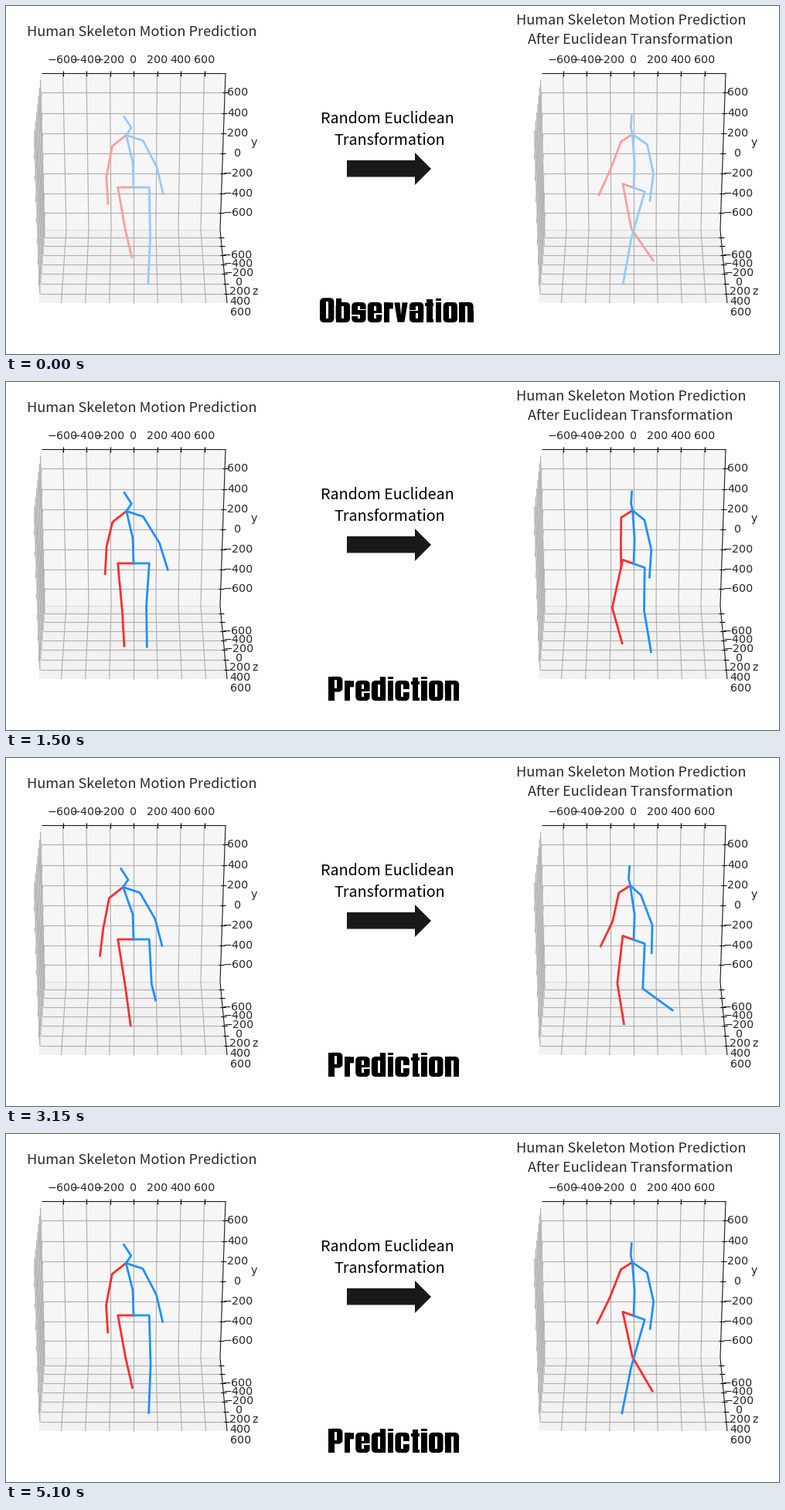
These frames come from a looping animation (1000 px wide and 451 px high, 5250 ms). A matplotlib script:

```python
import numpy as np
import matplotlib.pyplot as plt
from matplotlib.animation import FuncAnimation
from matplotlib.patches import FancyBboxPatch, Polygon
from matplotlib.transforms import Affine2D

W, H = 1000, 451
FRAMES, STEP = 35, 150
OBSERVED = 10     # frames before the prediction starts
STRIDE = 5200     # ms for one full gait cycle
SHIFT = 647       # distance between the two panels
PX = 0.72         # points per pixel at 100 dpi

fig = plt.figure(figsize=(W / 100, H / 100), dpi=100, facecolor="white")
ax = fig.add_axes([0, 0, 1, 1])
ax.set_xlim(0, W)
ax.set_ylim(H, 0)
ax.axis("off")


def lerp(a, b, f):
    return a + (b - a) * f


def fill(points, color, z=1):
    ax.add_patch(Polygon(points, fc=color, lw=0, zorder=z))


def line(a, b, color="#b2b2b2", width=1.2, z=2):
    ax.plot([a[0], b[0]], [a[1], b[1]], color=color, lw=width * PX, zorder=z,
            solid_capstyle="butt")


def label(x, y, text, size=14.2, font="DejaVu Sans", color="#262626", va="center"):
    ax.text(x, y, text, fontsize=size * PX, family=font, color=color,
            ha="center", va=va, zorder=4)


# ---- 3D boxes -------------------------------------------------------------


def panel(dx):
    def at(x, y):
        return np.array([x + dx, y], float)

    top_l, top_r = at(45.5, 87), at(284, 87)
    mid_l, mid_r = at(51, 290), at(277, 290)
    low_l, low_r = at(43, 385), at(286, 385)
    front = at(35.5, 172)

    fill([top_l, top_r, mid_r, mid_l], "#f6f6f6")
    fill([mid_l, mid_r, low_r, low_l], "#f2f2f2")
    fill([top_l, mid_l, low_l, front], "#e9e9e9")
    line(mid_l, mid_r, "#dedede")

    def tick(p):
        line(p - (3, 0), p + (4, 0), "black", 1.1, 3)

    for k in range(-3, 4):
        name = str(200 * k).replace("-", "\u2212")

        top, mid, low = (at(165 + gap * k, y) for gap, y in
                         ((30.5, 87), (29, 290), (31.2, 385)))
        line(top, mid)
        line(mid, low)
        line(top - (0, 3), top + (0, 4), "black", 1.1, 3)
        label(top[0], 69.5, name)

        y = 191.2 - 26 * k - 0.17 * k * k
        f = (y - 87) / 203
        back, edge = lerp(top_l, mid_l, f), lerp(top_r, mid_r, f)
        line(back, edge)
        line(back, lerp(front, low_l, f))
        tick(edge)
        label(300 + dx, y, name)

        y = 334.5 + 12.2 * k + 0.22 * k * k
        f = (y - 290) / 95
        back, edge = lerp(mid_l, low_l, f), lerp(mid_r, low_r, f)
        line(back, edge)
        line(back, lerp(top_l, front, f))
        tick(edge)
        label(301.5 + 0.8 * k + dx, y + 23.5, name)

    for a, b in ((top_l, top_r), (top_r, mid_r), (mid_r, low_r)):
        line(a, b, "#1a1a1a", 1.1, 3)
    label(321 + dx, 177, "y")
    label(322 + dx, 370, "z")


panel(0)
panel(SHIFT)

# ---- headings and arrow ---------------------------------------------------


def heading(x, y, text, size=18.15, color="#2a2a2a"):
    label(x, y, text, size, "Noto Sans CJK JP", color, "baseline")


heading(175.5, 39, "Human Skeleton Motion Prediction")
heading(808.5, 24, "Human Skeleton Motion Prediction")
heading(808, 49, "After Euclidean Transformation")
heading(493.5, 152, "Random Euclidean", 19.7, "black")
heading(496, 180, "Transformation", 19.7, "black")
fill([(441, 200), (529, 200), (529, 190), (550, 211), (529, 232), (529, 221.5),
      (441, 221.5)], "#191919", 3)

# ---- heavy condensed lettering: thick stems around a narrow slot ----------

STEM, GAP, BEARING, BAR = 7.6, 3, 1.2, 4.5
XH, CAP = 25.4, 31
L = BEARING
M = L + STEM
N = M + GAP
R = N + STEM


def box(x0, y0, x1, y1, r=0):
    style = f"round,pad=0,rounding_size={r}" if r else "square,pad=0"
    return x1, lambda **kw: FancyBboxPatch((x0, y0), x1 - x0, y1 - y0,
                                           boxstyle=style, **kw)


def wedge(*pts):
    return max(x for x, _ in pts), lambda **kw: Polygon(pts, **kw)


def stem(x=L, top=XH):
    return box(x, 0, x + STEM, top)


def bowl(bottom=0, top=XH):
    return box(L - 0.2, bottom - 0.4, R, top + 0.4, 5.5)


def slot(bottom=BAR, top=XH - BAR):
    return box(M, bottom, N, top)


def cut(x, y, height=1.7):
    return box(x, y, x + STEM + 1, y + height)


# letter: (ink shapes, gap shapes)
GLYPHS = {
    "O": ([bowl(0, CAP)], [slot(BAR, CAP - BAR)]),
    "P": ([stem(L, CAP), bowl(11.5, CAP - 0.4)], [slot(11.5 + BAR, CAP - BAR)]),
    "o": ([bowl()], [slot()]),
    "c": ([bowl()], [slot(), cut(N, 10.3, BAR)]),
    "e": ([bowl()], [slot(BAR, 11.3), slot(14.8), cut(N, 9.6)]),
    "b": ([stem(L, CAP), bowl()], [slot()]),
    "d": ([stem(N, CAP), bowl()], [slot()]),
    "n": ([stem(), stem(N, 15), bowl(8)], [slot(-0.2)]),
    "a": ([bowl(), stem(N, 18)], [slot(BAR, 11.5), slot(14.3), cut(0, 14.3)]),
    "s": ([bowl()], [slot(15.5), cut(N, 15.5), slot(BAR, 9.8), cut(0.2, 8.2)]),
    "r": ([stem(), box(M - 1, 17.3, 13.4, XH, 0.5)], []),
    "i": ([stem(), box(L, 27.3, M, CAP)], []),
    "t": ([stem(2.6, 30), box(0.6, 20.3, 11.9, 24.4), box(5, 0, 11.9, 4.2)], []),
    "v": ([wedge((0.3, XH), (17.7, XH), (13.4, 0), (4.6, 0))],
          [wedge((7.5, XH + 0.2), (10.5, XH + 0.2), (9, 9))]),
}


def lettering(x, base, word):
    parts = []
    for ch in word:
        ink, gaps = GLYPHS[ch]
        place = Affine2D().scale(1, -1).translate(x, base) + ax.transData
        for color, shapes in (("black", ink), ("white", gaps)):
            for _, make in shapes:
                patch = make(fc=color, lw=0, zorder=5, transform=place)
                parts.append(ax.add_patch(patch))
        x += max(right for right, _ in ink) + BEARING
    return parts


observation = lettering(405, 409.7, "Observation")
prediction = lettering(416, 412.7, "Prediction")

# ---- one walking body in 3D, offsets from the hip centre ------------------

THETA = 2 * np.pi * np.arange(FRAMES) * STEP / STRIDE


def wave(mean, cos1, sin1, cos2=0, sin2=0, phase=0):
    a = THETA + phase
    return (mean + cos1 * np.cos(a) + sin1 * np.sin(a)
            + cos2 * np.cos(2 * a) + sin2 * np.sin(2 * a))


def joint(x, y, z):
    return np.stack(np.broadcast_arrays(x, y, z, THETA)[:3])


def front(p):
    x, y, z = p
    return 165 + x, 235 + y


def turned(p):
    x, y, z = p
    return 165 + SHIFT + 0.7 * x + z, 235.5 + y + 0.25 * x + 0.17 * z


COLORS = {"red": ("#ff9e9e", "#ff2d2d"), "blue": ("#94caff", "#1f90ff")}
limbs = []


def limb(color, *joints):
    for view in (front, turned):
        art, = ax.plot([], [], lw=2, zorder=6 if color == "red" else 7,
                       solid_joinstyle="round", solid_capstyle="projecting")
        limbs.append((art, COLORS[color], np.array([view(p) for p in joints])))


def leg(color, hip_x, knee_x, ankle_x, phase):
    knee = joint(knee_x, wave(59.8, -4.3, 3, phase=phase),
                 wave(-7.8, 11.4, -7.2, 0.9, -1.6, phase))
    ankle = joint(ankle_x, wave(105, -17, -4.7, 2.5, -10.5, phase),
                  wave(3, 27, -2, -3, 8, phase))
    limb(color, root, joint(hip_x, 0, 0), knee, ankle)


sway = wave(0, 1.5, 2.2)
root = joint(0, 0, 0)
neck = joint(sway - 11, -67.7, 5)

limb("blue", root, joint(-1, -32.5, 1.8), neck,
     joint(sway - 4.4, -77.3, -1.6), joint(sway - 13.7, -91.5, 6))
limb("red", neck, joint(sway - 29, -53.5, 2.9),
     joint(sway - 36.7, wave(-15.8, 2, -5.5), wave(0, -5.5, 6.7)),
     joint(wave(-38, 5, 2.5), wave(19.3, 2, -5.5), wave(-9.8, -9.5, 15, -2.7)))
limb("blue", neck, joint(sway + 10.7, -60.5, wave(6, 3, 0)),
     joint(wave(30, 0, 3.5), -26.5, wave(3.3, 1.3, -3.7)),
     joint(wave(39.2, -1, 5), 8.3, wave(-5.7, 0, -5)))
leg("red", -20.3, wave(-11.6, 1, -2.8), wave(-5.3, 3, -6.2), 0)
leg("blue", 20.3, wave(21, 0.5, -4.5), wave(21.7, -7.5, -3, 4.7, -2), np.pi)


def draw(n):
    predicted = n >= OBSERVED
    for part in observation:
        part.set_visible(not predicted)
    for part in prediction:
        part.set_visible(predicted)
    for art, colors, path in limbs:
        art.set_data(path[:, 0, n], path[:, 1, n])
        art.set_color(colors[predicted])
    return []


anim = FuncAnimation(fig, draw, frames=FRAMES, interval=STEP, init_func=lambda: draw(0),
                     repeat=True, repeat_delay=0, blit=False)
plt.show()
```
